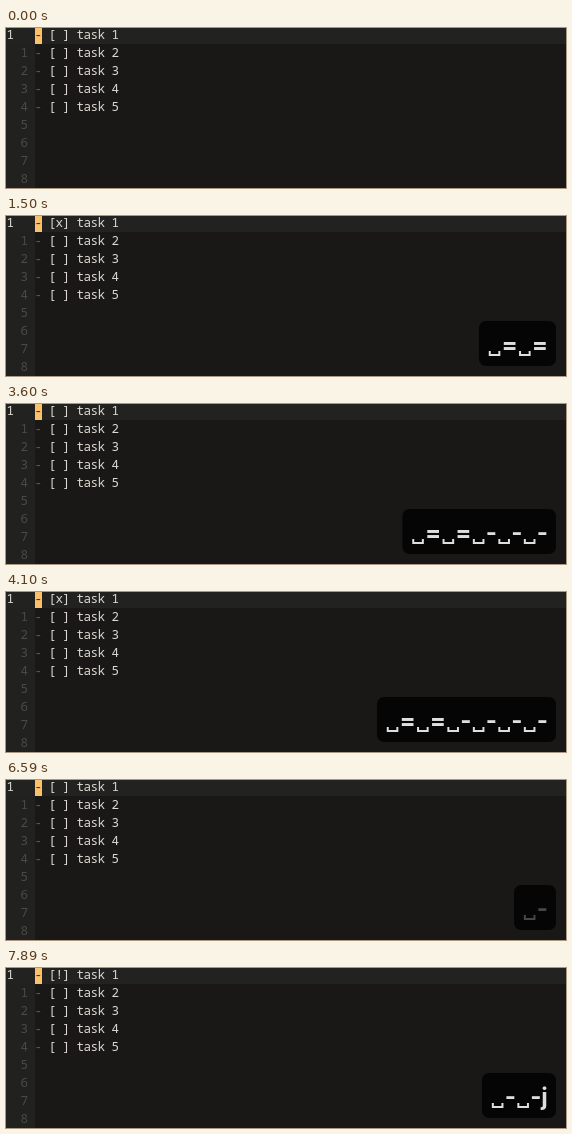
These frames come from a looping animation (560 px wide and 160 px high, 7990 ms). An HTML page:

```html
<!DOCTYPE html>
<html lang="en">
<head>
<meta charset="utf-8">
<style>
  html, body { margin: 0; width: 100%; height: 100%; overflow: hidden; background: #191816; }
  svg { display: block; width: 560px; height: 160px; }
  .code { font: 12.6px "Noto Sans Mono", "DejaVu Sans Mono", monospace; letter-spacing: calc(7px - .6em); white-space: pre; fill: #dcd9d2; }
  .code .num { fill: #4a4a47; }
  .code .dash { fill: #a03e38; }
  .code .dark { fill: #3a2c18; }
  .keys { font: 700 24px Inter, Roboto, sans-serif; text-anchor: middle; fill: #dedede; }
  .keys path { fill: none; stroke: #dedede; stroke-width: 2; }
</style>
</head>
<body>
<svg viewBox="0 0 560 160">
  <rect width="560" height="160" fill="#191816"/>
  <rect width="29" height="160" fill="#21211f"/>
  <rect width="560" height="16" fill="#222221"/>
  <rect x="29" width="7" height="16" fill="#fbc16a"/>
  <g class="code" id="code"></g>
  <rect id="panel" y="105" height="45" rx="7" fill="#000" fill-opacity=".78"/>
  <g class="keys" id="keys"></g>
</svg>
<script>
const LOOP = 7990, COL = 7, ROW = 18;
const $ = id => document.getElementById(id);

function add(parent, tag, attrs, text = '') {
  const el = document.createElementNS('http://www.w3.org/2000/svg', tag);
  for (const k in attrs) el.setAttribute(k, attrs[k]);
  el.textContent = text;
  parent.appendChild(el);
  return el;
}

const put = (col, row, text, cls = '') =>
  add($('code'), 'text', { x: 0.5 + col * COL, y: 10.8 + row * ROW, class: cls }, text);

put(0, 0, '1');
for (let row = 1; row < 9; row++) put(2, row, row, 'num');
for (let row = 0; row < 5; row++) {
  put(4, row, '-', row ? 'dash' : 'dark');
  put(6, row, '[');
  put(8, row, ']');
  put(10, row, 'task ' + (row + 1));
}
const mark = put(7, 0, ' ');

// Each entry: start time, typed keys, glyph opacity
const typed = [
  [0, '', 0],
  [990, '_=', .3], [1100, '_=', .65], [1200, '_=', 1],
  [1400, '_=_=', 1],
  [2500, '_=_=_-', 1],
  [2900, '_=_=_-_-', 1],
  [3600, '_=_=_-_-_-', 1],
  [4000, '_=_=_-_-_-_-', 1],
  [4500, '_=_=_-_-_-_-_-', 1],
  [6590, '_-', .3], [6690, '_-', .65], [6790, '_-', 1],
  [7490, '_-_-', 1],
  [7890, '_-_-j', 1]
];
const marks = [
  [0, ' '], [990, '~'], [1500, 'x'], [2600, '~'], [3000, ' '],
  [3700, '!'], [4100, 'x'], [4590, '~'], [6590, ' '], [7590, '!']
];
const ADVANCE = { _: 14.8, '=': 15.5, '-': 10.7, j: 6.5 };

function showKeys(keys, opacity) {
  const group = $('keys'), panel = $('panel');
  group.replaceChildren();
  group.setAttribute('opacity', opacity);
  let x = 541.75;
  for (const key of [...keys].reverse()) {
    const mid = x - ADVANCE[key] / 2;
    if (key === '_') add(group, 'path', { d: `M${mid - 4.8} 135v4h9.6v-4` });
    else add(group, 'text', { x: mid, y: 136.7 }, key);
    x -= ADVANCE[key];
  }
  panel.setAttribute('x', x - 8.25);
  panel.setAttribute('width', keys ? 558.25 - x : 0);
}

const at = (list, t) => list.findLast(step => step[0] <= t);
const start = performance.now();
let shown;

function draw() {
  const t = Math.max(0, performance.now() - start) % LOOP;
  mark.textContent = at(marks, t)[1];
  const step = at(typed, t);
  if (step !== shown) showKeys(step[1], step[2]);
  shown = step;
  requestAnimationFrame(draw);
}
draw();
</script>
</body>
</html>
```
